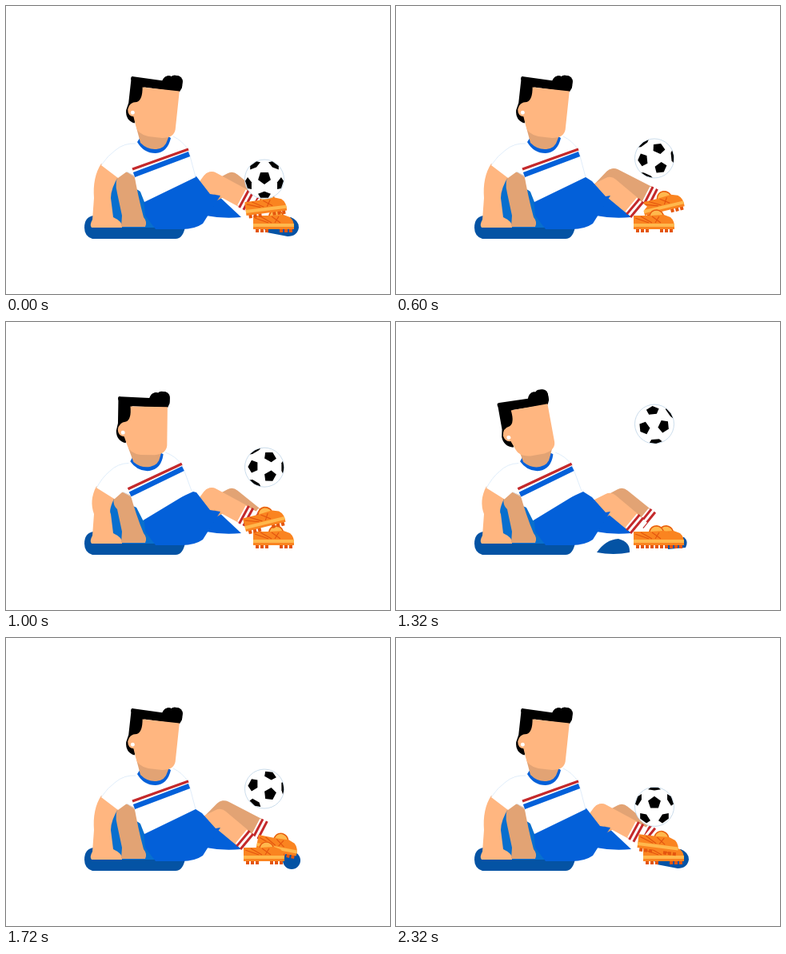
An HTML page with a canvas for the animation above (2360 ms loop, 480 by 360 pixels).

```html
<!DOCTYPE html>
<html lang="en">
<head>
<meta charset="utf-8">
<title>Keepy-uppy</title>
<style>
html, body { margin: 0; width: 100%; height: 100%; overflow: hidden; background: #fff; }
canvas { display: block; width: 480px; height: 360px; }
</style>
</head>
<body>
<canvas id="stage" width="480" height="360"></canvas>
<script>
const ctx = document.getElementById('stage').getContext('2d');
const LOOP = 2360, STEP = 40, RAD = Math.PI / 180;
const SKIN = '#ffb680', TAN = '#e2a374', BLUE = '#0360d9', SHADE = '#086fce', NAVY = '#0453a4',
      RED = '#c4292b', ORANGE = '#fa8420', RUST = '#e4560f', GOLD = '#ffb84d', RIM = '#d3e6f8';
const HIP = [205, 265], NECK = [185, 165];

// The feet take turns; each touch starts the next bounce
const bounces = [
  { start: 0, height: 30, spin: 234, tilt: 0 },
  { start: 550, height: 42, spin: 500, tilt: 1 },
  { start: 902, height: 86, spin: 455, tilt: 1 },
  { start: 1780, height: 20, spin: 311, tilt: 0 },
];
const startOf = i => bounces[i] ? bounces[i].start : LOOP;
const touchY = i => i % 2 ? 210 : 216.5;

const mix = (a, b, u) => a + (b - a) * u;
const mixPoint = (p, q, u) => p.map((v, i) => mix(v, q[i], u));
const clamp = u => Math.min(1, Math.max(0, u));
const smooth = u => u * u * (3 - 2 * u);
const ramp = (t, a, b) => smooth(clamp((t - a) / (b - a)));
const hold = (t, a, b, c, d) => ramp(t, a, b) - ramp(t, c, d);
const since = (t, touch) => (t - touch + LOOP * 1.5) % LOOP - LOOP / 2;

// Lift of a foot (0..1) and its angle, toe dropping before the touch and flicking up after it
function kick(t, side) {
  const gaps = bounces.filter((b, i) => i % 2 === side).map(b => since(t, b.start));
  const d = gaps.reduce((a, b) => Math.abs(a) < Math.abs(b) ? a : b);
  const lift = smooth(clamp(1.5 - Math.abs(d - 40) / 160));
  return [lift, -14 * lift * Math.tanh((d + 20) / 35)];
}

function fill(d, color) {
  ctx.fillStyle = color;
  ctx.fill(new Path2D(d));
}

function stroke(d, color, width) {
  ctx.strokeStyle = color;
  ctx.lineWidth = width;
  ctx.lineJoin = 'round';
  ctx.stroke(new Path2D(d));
}

function dot(x, y, r, color) {
  ctx.fillStyle = color;
  ctx.beginPath();
  ctx.arc(x, y, r, 0, 7);
  ctx.fill();
}

function turned([x, y], deg, size, draw) {
  ctx.save();
  ctx.translate(x, y);
  ctx.rotate(deg * RAD);
  ctx.scale(size, size);
  ctx.translate(-x, -y);
  draw();
  ctx.restore();
}

function rotate(p, i, j, deg) {
  const c = Math.cos(deg * RAD), s = Math.sin(deg * RAD), q = [...p];
  q[i] = p[i] * c - p[j] * s;
  q[j] = p[i] * s + p[j] * c;
  return q;
}

function shadow(t) {
  fill('M109 262H190L224 276Q221 291 212 291H108Q98 288 98 277Q98 264 109 262Z', NAVY);
  if (Math.abs(since(t, 0)) < 140) fill('M312 264H356Q366 268 366 277Q364 288 352 288L326 283Z', NAVY);
  if (Math.abs(since(t, 1340)) < 140) {
    fill('M251 288Q262 272 278 271Q293 275 292 288Q272 292 251 288Z', NAVY);
    fill('M340 269H360Q366 274 362 282L340 284Z', NAVY);
  }
  if (Math.abs(since(t, 1760)) < 120) dot(357, 278, 11, NAVY);
}

function shoe([x, y], deg) {
  ctx.save();
  ctx.translate(x, y);
  ctx.rotate(deg * RAD);
  ctx.fillStyle = RUST;
  for (let s = 3; s < 48; s += 6) if (s !== 21 && s !== 27) ctx.fillRect(s, -5, 4, 5);
  fill('M0 -21L19 -21Q21 -29 29 -29Q36 -28 38 -22L46 -19Q52 -14 51 -4H0Z', ORANGE);
  fill('M20 -21Q22 -28 29 -28Q35 -27 37 -22Z', GOLD);
  stroke('M20 -21Q22 -28 29 -28Q35 -27 37 -22M2 -18L19 -12M9 -20L23 -12M23 -20L34 -12M32 -20L27 -12', RUST, 1.2);
  fill('M0 -11H51V-7H0Z', GOLD);
  ctx.restore();
}

function leg(hip, knee, ankle, color) {
  const dx = ankle[0] - knee[0], dy = ankle[1] - knee[1], len = Math.hypot(dx, dy);
  const along = d => [ankle[0] + dx / len * d, ankle[1] + dy / len * d];
  stroke(`M${hip}L${knee}L${along(-10)}`, color, 24);
  stroke(`M${along(-12)}L${along(5)}`, '#fff', 22);
  for (const d of [-10, -4]) stroke(`M${along(d)}L${along(d + 3)}`, RED, 25);
}

function legs(t) {
  const [far, farTurn] = kick(t, 1), [near, nearTurn] = kick(t, 0);
  fill('M236 264L262 234L294 264Q270 266 250 262Z', BLUE);
  leg([252, 236], mixPoint([282, 220], [272, 215], far), mixPoint([318, 249], [323, 241], far), TAN);
  shoe(mixPoint([309, 283], [312, 266], far), farTurn);
  leg([243, 238], mixPoint([267, 226], [257, 219], near), mixPoint([303, 256], [305, 245], near), SKIN);
  shoe(mixPoint([297, 283], [301, 266], near), nearTurn);
  const top = mixPoint([245, 219], [238, 213], near), cuff = mixPoint([262, 238], [255, 235], near);
  fill(`M172 240L234 212L${top}L${cuff}L268 237L246 272Q236 279 220 279H187L174 262Z`, BLUE);
}

function arms(lean) {
  const p = (x, y) => {
    const [dx, dy] = rotate([x - HIP[0], y - HIP[1]], 0, 1, lean);
    return `${HIP[0] + dx} ${HIP[1] + dy}`;
  };
  fill(`M${p(132, 210)}L178 238L188 277H140L130 262L129 235Z`, SHADE);
  fill(`M${p(119, 197)}Q${p(108, 214)} 110 240L108 267Q104 274 107 277H145Q147 270 134 264L131 240Q${p(131, 228)} ${p(141, 212)}Z`, SKIN);
  fill(`M${p(142, 206)}Q${p(135, 220)} 139 234L145 262L144 276H174Q177 270 172 264Q${p(165, 238)} ${p(160, 209)}Z`, TAN);
}

function head() {
  fill('M160 90Q156 89 157 95L154 122L151 131Q150 143 161 147L173 125V103L216 109L219 104Q222 91 213 89Q208 87 205 91Q199 87 195 95Z', '#000');
  dot(203, 95, 6, '#000');
  dot(213, 96, 7, '#000');
  fill('M171 103L216 108L211 155Q209 165 195 165L178 163Q165 160 163 151L160 139Q153 138 153 130Q155 121 164 121Q171 119 171 103Z', SKIN);
  dot(159, 134, 2.4, '#fff');
}

function torso(lean, nod) {
  turned(HIP, lean, 1, () => {
    fill('M165 172Q150 170 137 180Q127 187 119 199L140 215L151 207L160 212L173 245L237 214L228 180Q220 168 208 163Z', '#fff');
    stroke('M162 172Q148 171 137 180Q127 187 119 199M209 163Q220 168 228 180L237 214M151 207L160 213', RIM, .7);
    stroke('M158 204L228 179', RED, 3.4);
    stroke('M160 211L229 185', BLUE, 6.5);
    fill('M164 170Q172 184 187 184Q202 183 206 165L200 161H170Z', BLUE);
    fill('M163 152L168 171Q177 180 188 179Q199 178 202 167L206 156Z', TAN);
    turned(NECK, nod, 1.025, head);
  });
}

// Ball patches sit on the corners of an icosahedron
const corners = [], GOLDEN = (1 + Math.sqrt(5)) / 2;
for (const a of [-1, 1]) for (const b of [-GOLDEN, GOLDEN])
  corners.push([a, 0, b], [0, b, a], [b, a, 0]);
const gap = (p, q) => Math.hypot(...p.map((v, k) => v - q[k]));
const patches = corners.map(v => {
  const ring = corners.filter(n => n !== v && gap(n, v) < 2.1);
  return ring.map(n => {
    const p = mixPoint(v, n, .33), size = Math.hypot(...p);
    return p.map(c => c / size);
  });
});

function patch(points, r) {
  const [mx, my, mz] = [0, 1, 2].map(k => points.reduce((sum, p) => sum + p[k], 0) / 5);
  if (mz < .08) return;
  const angle = p => Math.atan2(p[1] - my, p[0] - mx);
  points.sort((p, q) => angle(p) - angle(q));
  ctx.beginPath();
  for (const [x, y, z] of points) {
    const k = z < 0 ? r / Math.hypot(x, y) : r;
    ctx.lineTo(x * k, y * k);
  }
  ctx.fill();
}

function ball(t) {
  const i = bounces.findLastIndex(b => b.start <= t), { start, height, spin, tilt } = bounces[i];
  const u = (t - start) / (startOf(i + 1) - start), r = 24.5;
  const side = tilt * clamp(1.3 * Math.abs(2 * u - 1));
  ctx.save();
  ctx.translate(323, mix(touchY(i), touchY(i + 1), u) - 4 * height * u * (1 - u));
  dot(0, 0, r, '#fff');
  ctx.strokeStyle = '#bdd3e6';
  ctx.lineWidth = .8;
  ctx.stroke();
  ctx.clip();
  ctx.fillStyle = '#000';
  for (const points of patches) {
    patch(points.map(p => {
      p = rotate(p, 0, 1, 90 * side);
      p = rotate(p, 2, 0, 21 * side);
      return rotate(p, 1, 2, 180 + (u - .5) * spin);
    }), r);
  }
  ctx.restore();
}

function draw(now) {
  const t = Math.floor((now % LOOP) / STEP) * STEP;
  const lean = -5.5 * hold(t, 800, 1020, 1480, 1700);
  const nod = -11 * hold(t, 1000, 1240, 1400, 1640);
  ctx.fillStyle = '#fff';
  ctx.fillRect(0, 0, 480, 360);
  shadow(t);
  arms(lean);
  legs(t);
  torso(lean, nod);
  ball(t);
}

const begin = performance.now();
function tick() {
  draw(performance.now() - begin);
  requestAnimationFrame(tick);
}
tick();
</script>
</body>
</html>
```
